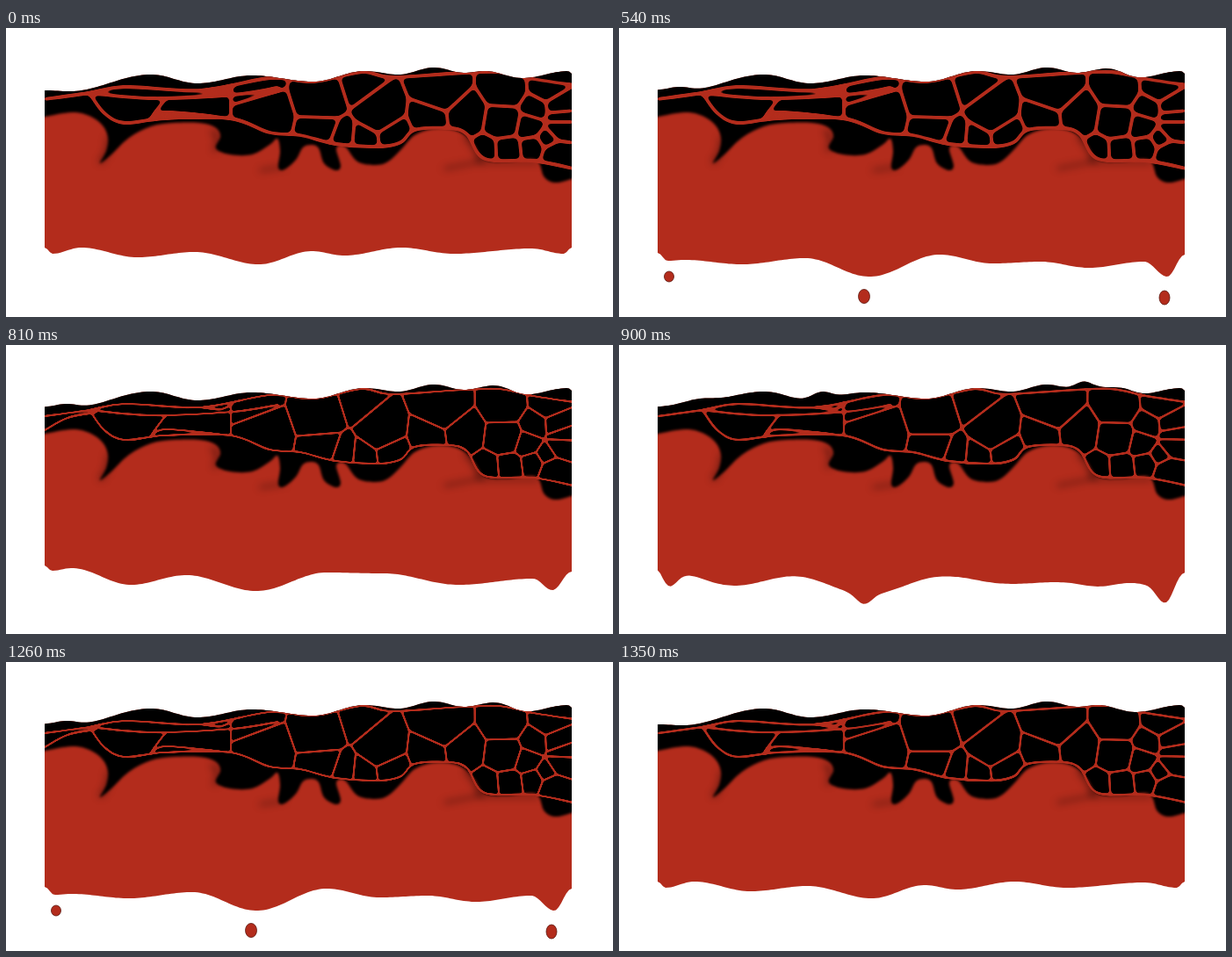
Write an HTML page that moves like this. It is 691 px wide and 329 px high and loops after 1530 ms.

```html
<!DOCTYPE html>
<html lang="en">
<head>
<meta charset="utf-8">
<title>Cracked crust drip</title>
<style>
html, body { margin: 0; width: 100%; height: 100%; overflow: hidden; background: #fff; }
svg { display: block; width: 691px; height: 329px; }
</style>
</head>
<body>
<svg viewBox="0 0 691 329">
  <defs>
    <filter id="soft" filterUnits="userSpaceOnUse" x="0" y="0" width="691" height="329" color-interpolation-filters="sRGB">
      <feGaussianBlur stdDeviation="1.4"/>
    </filter>
    <filter id="haze" filterUnits="userSpaceOnUse" x="0" y="0" width="691" height="329" color-interpolation-filters="sRGB">
      <feGaussianBlur stdDeviation="4"/>
    </filter>
    <!-- blur and threshold: fills the corners where veins meet -->
    <filter id="web" filterUnits="userSpaceOnUse" x="0" y="0" width="691" height="329" color-interpolation-filters="sRGB">
      <feGaussianBlur id="spread"/>
      <feColorMatrix values="1 0 0 0 0  0 1 0 0 0  0 0 1 0 0  0 0 0 9 -3.6"/>
    </filter>
    <clipPath id="bodyClip"><path id="bodyEdge"/></clipPath>
    <clipPath id="bandClip"><path id="bandEdge"/></clipPath>
  </defs>
  <path id="body" fill="#b32c1c"/>
  <g id="drops" fill="#b32c1c" stroke="#5a160e" stroke-width=".8"></g>
  <g clip-path="url(#bodyClip)">
    <g filter="url(#haze)" fill="none" stroke="#000" stroke-linecap="round" stroke-opacity=".45">
      <path stroke-width="5" d="M117 126Q117 142 108 152M236 118Q246 128 238 138"/>
      <path stroke-width="3" d="M290 162L316 158M500 160L535 153L605 153"/>
      <path stroke-width="8" d="M526 124Q538 136 540 150"/>
    </g>
    <path id="mass" filter="url(#soft)"/>
    <g filter="url(#web)" fill="none" stroke="#b32c1c" stroke-linejoin="round" stroke-linecap="round">
      <path id="cells" clip-path="url(#bandClip)"/>
      <path id="strands"/>
    </g>
  </g>
</svg>
<script>
const $ = id => document.getElementById(id);
const set = (id, name, value) => $(id).setAttribute(name, value);
const pairs = s => s.split(' ').map(p => p.split(',').map(Number));
const bell = (x, c, w) => Math.exp(-(((x - c) / w) ** 2));
const LEFT = 44, RIGHT = 644;

// Smooth open curve through key points
function curve(s, start = 'M') {
  const p = pairs(s);
  let d = start + p[0];
  for (let i = 0; i < p.length - 1; i++) {
    const a = p[i - 1] || p[i], b = p[i], c = p[i + 1], e = p[i + 2] || c;
    const ctl = (m, u, v, k) => [0, 1].map(j => m[j] + k * (v[j] - u[j]) / 6);
    d += `C${ctl(b, a, c, 1)} ${ctl(c, b, e, -1)} ${c}`;
  }
  return d;
}

// Height function that eases between crests and troughs
function wave(s) {
  const p = pairs(s);
  return x => {
    const i = Math.max(1, p.findIndex(q => q[0] >= x));
    const [x0, y0] = p[i - 1], [x1, y1] = p[i];
    return y0 + (y1 - y0) * (1 - Math.cos(Math.PI * (x - x0) / (x1 - x0))) / 2;
  };
}

const rim = wave('44,71 72,72 165,53 218,63 280,54 350,61 408,49 447,53 487,45 522,51 545,49 588,57 640,49 644,52');
const lifted = (...lifts) => x => lifts.reduce((y, [c, h, w]) => y - h * bell(x, c, w), rim(x));
const tops = {
  rest: rim,
  swell: lifted([70, 5, 18], [565, 5, 20]),
  high: lifted([88, 9, 28], [230, 9, 16], [528, 9, 14], [575, 6, 18])
};

const dripX = [57, 279, 621];
const bottoms = {
  rest: wave('44,250 53,257 85,250 150,261 215,255 288,269 348,254 385,259 450,250 510,257 598,251 635,257 644,250'),
  drip: wave('44,256 55,265 75,264 140,269 212,262 285,283 365,258 425,268 480,266 535,273 598,266 624,283 644,258'),
  sag: wave('44,251 52,257 75,254 142,273 205,262 285,280 365,259 430,260 515,273 600,266 622,279 644,258'),
  fall: wave('44,255 60,272 75,270 112,278 192,264 280,288 375,268 440,283 505,268 550,279 580,275 622,286 644,260'),
  hang: x => dripX.reduce((y, c) => y + 11 * bell(x, c, 12), (bottoms.sag(x) + bottoms.fall(x)) / 2)
};

// Drop sizes and heights, one per dripX
const low = [[283, 5.5, 6], [305.5, 6.5, 8], [307, 6, 8]];
const near = [[278, 5.5, 5], [297, 10.5, 6.5], [295.5, 6.5, 6]];

const bandTop = '44,81 95,74 135,67 222,71 300,57 350,61 405,50 437,56 505,52 560,50 600,58 646,65';
const bandBottom = '95,74 112,97 135,108 180,103 256,103 300,119 335,122 375,132 425,135 450,130 465,116 505,114 525,121 545,149 600,151 646,160';
const strands = ['95,74 165,80 258,76 310,68', '182,80 165,104 182,96 256,103', '222,71 245,73 258,67'];
const sideStrand = '44,97 70,83 102,77';

// Cell centres with the radius each one claims
const seeds = pairs(
  '295,100,22 285,66,11 358,80,22 357,114,13 384,124,6 408,126,9 440,122,10 402,66,10 424,96,19 ' +
  '495,68,22 483,103,11 524,99,15 568,70,17 615,67,12 566,106,15 602,92,8 596,112,10 628,89,7 ' +
  '629,101,6 629,115,8 616,127,7 625,145,13 600,137,10 571,140,11 548,141,7'
);

// Power-diagram cell: a box cut by the border with every other seed
function cell(a, all) {
  let poly = [[256, 40], [650, 40], [650, 170], [256, 170]];
  const size = ([x, y, r]) => x * x + y * y - r * r;
  for (const b of all) {
    if (a === b) continue;
    const side = p => 2 * (p[0] * (b[0] - a[0]) + p[1] * (b[1] - a[1])) - size(b) + size(a);
    poly = poly.flatMap((p, i) => {
      const q = poly[(i + 1) % poly.length], s = side(p), t = side(q), k = s / (s - t);
      const cut = [p[0] + k * (q[0] - p[0]), p[1] + k * (q[1] - p[1])];
      return [...(s <= 0 ? [p] : []), ...(s * t < 0 ? [cut] : [])];
    });
  }
  return poly.length ? 'M' + poly.map(p => p.map(v => v.toFixed(1))).join('L') + 'Z' : '';
}

const nets = {
  thick: { width: 3.8, spread: 2.1, sway: 0 },
  thin: { width: 2.2, spread: 1.2, sway: 3, side: true },
  open: { width: 2.5, spread: 1.4, sway: 1 }
};

const LOOP = 1530;
const steps = [
  [0, 'rest', 'rest', [], 'thick'],
  [540, 'swell', 'drip', low, 'thick'],
  [630, 'rest', 'rest', [], 'thick'],
  [810, 'swell', 'sag', [], 'thin'],
  [900, 'high', 'hang', [], 'open'],
  [1080, 'high', 'fall', near, 'thick'],
  [1260, 'swell', 'drip', low, 'thin'],
  [1350, 'rest', 'rest', [], 'open']
];

const massEdge = '30,103 44,101 75,96 95,100 110,111 116,125 114,140 107,154 120,144 140,125 165,112 190,108 220,108 ' +
  '238,113 244,123 239,137 255,144 280,144 300,133 309,126 312,140 310,159 317,161 330,150 338,136 348,133 356,137 ' +
  '362,154 375,162 381,157 376,137 386,135 400,152 420,156 435,152 450,138 465,122 485,115 505,115 521,121 533,133 ' +
  '545,150 570,152 603,150 613,170 628,176 655,168';
set('mass', 'd', 'M30 30' + curve(massEdge, 'L') + 'V30Z');
set('bandEdge', 'd', curve(bandTop) + 'V160' + curve(bandBottom.split(' ').reverse().join(' '), 'L') + 'Z');

function show([, top, bottom, drops, net]) {
  const xs = Array.from({ length: 201 }, (_, i) => LEFT + i * (RIGHT - LEFT) / 200);
  const trace = f => xs.map(x => [x, f(x).toFixed(1)]);
  const d = 'M' + [...trace(tops[top]), ...trace(bottoms[bottom]).reverse()].join('L') + 'Z';
  set('body', 'd', d);
  set('bodyEdge', 'd', d);
  $('drops').innerHTML = drops.map(([y, rx, ry], i) =>
    `<ellipse cx="${dripX[i]}" cy="${y}" rx="${rx}" ry="${ry}"/>`).join('');

  const { width, spread, sway, side } = nets[net];
  const moved = seeds.map(([x, y, r], i) => [x + sway * Math.sin(i * 5), y + sway * Math.cos(i * 7) / 2, r]);
  const lines = [bandTop, bandBottom, ...strands, ...(side ? [sideStrand] : [])];
  set('cells', 'd', moved.map(s => cell(s, moved)).join(''));
  set('strands', 'd', lines.map(s => curve(s)).join(''));
  set('cells', 'stroke-width', width);
  set('strands', 'stroke-width', width);
  set('spread', 'stdDeviation', spread);
}

const begin = performance.now();
let current;
function tick() {
  const t = (performance.now() - begin) % LOOP;
  const step = steps.findLast(s => s[0] <= t);
  if (step !== current) show(current = step);
  requestAnimationFrame(tick);
}
tick();
</script>
</body>
</html>
```
